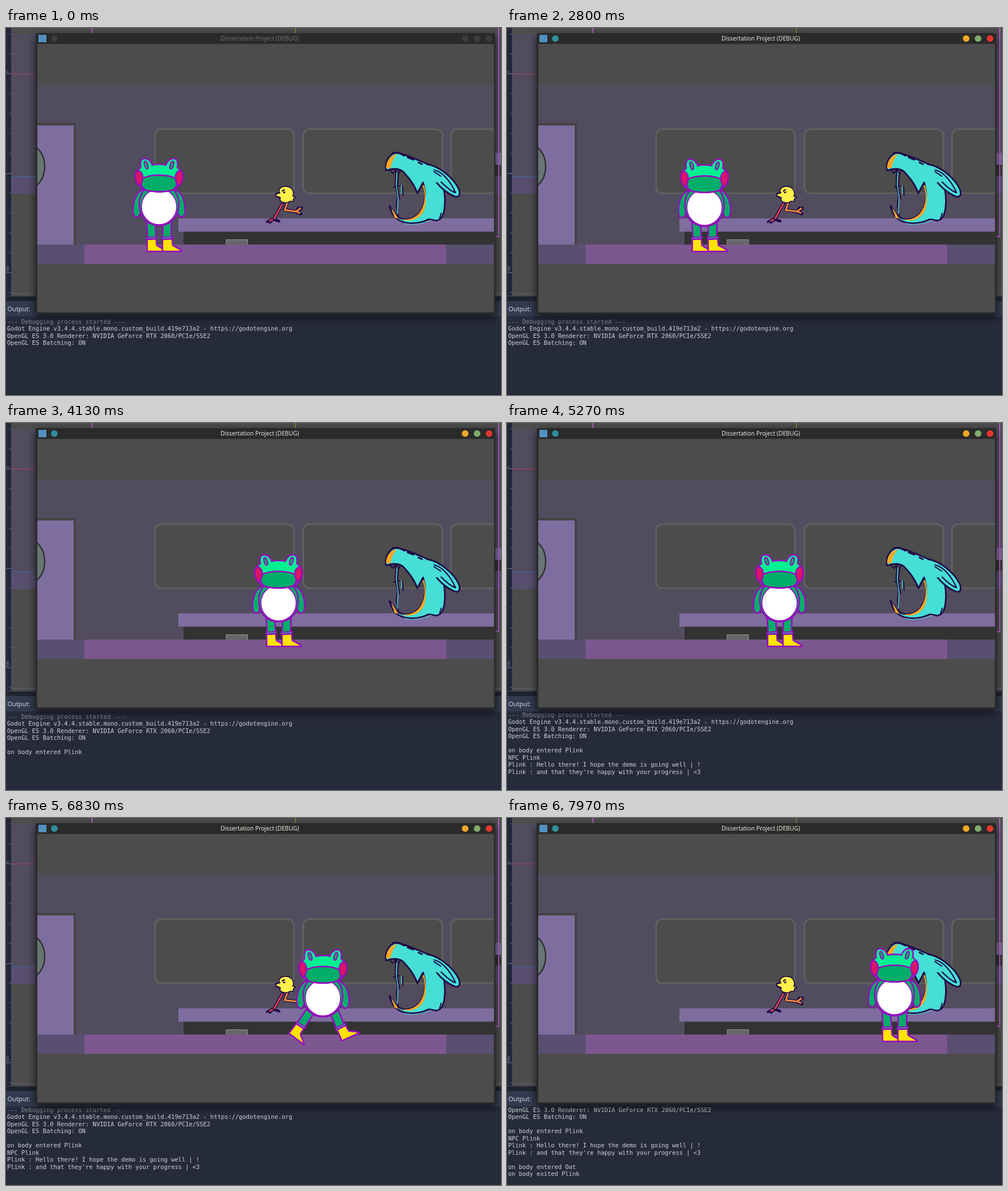
Recreate the animation shown at these times as an HTML page. Size 870 px wide and 644 px high, loop 8 s.

```html
<!DOCTYPE html>
<html lang="en">
<head>
<meta charset="utf-8">
<title>Game debug session</title>
<style>
  html, body { margin: 0; width: 100%; height: 100%; overflow: hidden; background: #262b3b; }
  svg { display: block; width: 870px; height: 644px; }
  .ui { font-family: "Noto Sans", sans-serif; }
  #log { font: 10.42px "DejaVu Sans Mono", monospace; fill: #d0d2d6; white-space: pre; }
  .frog { stroke: #9a08c0; stroke-width: 2.6; stroke-linejoin: round; stroke-linecap: round; }
  .light { fill: #00f092; }
  .dark { fill: #00ad69; }
  .pink { fill: #d91566; }
  .boot { fill: #ffe400; }
  .ink { stroke: #210b48; stroke-linejoin: round; stroke-linecap: round; }
  .aqua { fill: #45dfd5; }
  .gold { fill: #f6a823; }
  .line { fill: none; }
</style>
</head>
<body>
<svg viewBox="0 0 870 644">
  <defs>
    <filter id="shade" x="-10%" y="-10%" width="120%" height="120%">
      <feDropShadow dx="0" dy="6" stdDeviation="8" flood-color="#000" flood-opacity=".68"/>
    </filter>
    <clipPath id="view"><rect x="55" y="28" width="802.5" height="471"/></clipPath>
    <clipPath id="logArea"><rect y="506" width="870" height="138"/></clipPath>
  </defs>

  <!-- editor behind the window -->
  <rect width="870" height="470" fill="#4d4d4d"/>
  <rect y="10" width="870" height="250" fill="#524c5f"/>
  <rect y="260" width="870" height="31" fill="#584f70"/>
  <rect x="858" y="219" width="12" height="21" fill="#7e6d9e"/>
  <rect x="858" y="240" width="12" height="19" fill="#333"/>
  <path d="M9 80.5H52" stroke="#b3404c"/>
  <path d="M9 260.5H52" stroke="#3a6f9e"/>
  <path d="M508.5 0V9" stroke="#7fb526"/>
  <path d="M151 0V9M866 0V366M858 366H867" stroke="#b05cc0" stroke-width="2"/>
  <rect width="9" height="470" fill="#22273a"/>
  <path d="M7.5 10V466" stroke="#68708a" stroke-width="3" stroke-dasharray="1 33.9"/>
  <path d="M0 80.5H9M0 255.5H9M0 429.5H9" stroke="#68708a"/>
  <g class="ui" font-size="6" fill="#9299a9">
    <text transform="translate(5 79) rotate(-90)">0</text>
    <text transform="translate(5 428) rotate(-90)">500</text>
  </g>
  <path d="M9 466H870" stroke="#5a5a5a" stroke-width="2"/>
  <rect y="470" width="870" height="9" fill="#1e2330"/>
  <path d="M0 470.5H870" stroke="#444a59"/>
  <rect y="479" width="870" height="27" fill="#323a4e"/>
  <rect y="506" width="870" height="138" fill="#262b3b"/>
  <text class="ui" x="2.5" y="496.5" font-size="11" fill="#d3d6dd">Output:</text>
  <g clip-path="url(#logArea)"><g id="log"></g></g>

  <!-- game window -->
  <rect x="52" y="9" width="808" height="492.5" rx="2" fill="#292929" filter="url(#shade)"/>
  <rect x="57" y="12" width="14" height="13" rx="1" fill="#5290c0"/>
  <g id="buttons">
    <circle cx="85" cy="18.5" r="5.8" data-on="#2f8f9c"/>
    <circle cx="807" cy="18.5" r="5.8" data-on="#eda827"/>
    <circle cx="828" cy="18.5" r="5.8" data-on="#7fac6b"/>
    <circle cx="849" cy="18.5" r="5.8" data-on="#e5362d"/>
  </g>
  <text id="title" class="ui" x="446" y="22" font-size="10.25" text-anchor="middle">Dissertation Project (DEBUG)</text>

  <g clip-path="url(#view)">
    <rect x="55" y="28" width="803" height="471" fill="#4c4c4c"/>
    <rect x="55" y="100" width="803" height="280" fill="#524c5f"/>
    <g fill="#4c4c4c" stroke="#606060" stroke-width="3">
      <rect x="262" y="177.5" width="244" height="112.5" rx="11"/>
      <rect x="522.5" y="177.5" width="244.5" height="112.5" rx="11"/>
      <rect x="782" y="177.5" width="244" height="112.5" rx="11"/>
    </g>
    <rect x="55" y="166.5" width="68" height="214" fill="#444"/>
    <rect x="55" y="171" width="64" height="209" fill="#7e6e9f"/>
    <ellipse cx="41" cy="243" rx="27" ry="37.5" fill="#687575" stroke="#303030" stroke-width="2.4"/>
    <rect x="303" y="334" width="555" height="23.5" fill="#7e6d9e"/>
    <rect x="312" y="357.5" width="546" height="22.5" fill="#333"/>
    <path d="M378 334H857M378 357H857" stroke="#4c4268" stroke-dasharray="2 74"/>
    <rect x="387" y="371.5" width="37.5" height="9" fill="#666" stroke="#969696"/>
    <rect x="55" y="380" width="803" height="34" fill="#594f70"/>
    <rect x="138" y="380" width="635.5" height="34" fill="#7c578f"/>

    <!-- chick -->
    <g class="ink line">
      <path stroke-width="5.6" d="M487 306L472 333M495 305L489.500 319L511 322.500L519 316M511 323L518 326M511 321L514 316"/>
      <path stroke-width="4.600" d="M459 340L469 335L480 339M469 336L464 341"/>
    </g>
    <path d="M486 308L471 335M463 339L469 336" fill="none" stroke="#e8434f" stroke-width="2.6"/>
    <path d="M495 305L490 319.500L510 322L518 316M510 322L517 325" fill="none" stroke="#f58a36" stroke-width="2.900"/>
    <path class="ink" fill="#fff04a" stroke-width="1.700" d="M480 284C483 277 495 276 501 281C506 286 506 292 504 295L509 297L505 300L505 304L499 304C495 308 486 307 482 303L481 298L474 295L475 290L480 289Z"/>
    <path class="ink line" stroke-width="2.400" d="M474 291L481 289M475 295L482 298M486 286L489 284M488 289L490 288"/>

    <!-- rabbit -->
    <g class="ink" stroke-width="2.8">
      <path class="aqua" d="M668 250C665 233 676 219 687 219C704 221 736 238 752 243C766 253 773 290 771 312C770 327 765 337 756 338C749 337 744 334 740 337C727 343 714 344 700 341C684 337 677 326 674 312L688 331C698 338 714 338 726 325C738 310 739 290 733 271L723 290C717 273 707 262 698 252C690 246 680 246 668 250Z"/>
      <path class="aqua" d="M740 239C760 242 786 262 796 283C799 292 797 297 790 296C775 291 758 276 748 258"/>
      <path class="aqua" stroke-width="2.200" d="M750 249C765 250 781 268 790 289C778 285 766 272 757 262Z"/>
    </g>
    <path class="aqua" d="M736 240C748 243 758 253 765 270L745 272Z"/>
    <path class="gold" d="M668 246C668 233 675 224 688 221C680 229 677 239 676 246Z"/>
    <path class="gold" d="M732 276C739 294 736 312 726 325C716 336 702 338 693 334C709 343 728 335 735 320C740 305 738 289 735 276Z"/>
    <path class="gold" d="M677 315L690 335L683 333Z"/>
    <g class="ink line">
      <path stroke-width="3" d="M680 219L690 219L700 224M706 227L716 231M725 236L731 239"/>
      <path stroke-width="2" d="M674 249L680 255L685 249L690 256L693 249M685 250L684 275L688 295L686 312L690 333M690 255L688 278L692 300M681 279L692 277M697 277L698 294M765 325L762 334M752 252L764 260"/>
    </g>
    <path d="M687 253L686 275L689 297L688 326M695 276L695 290" fill="none" stroke="#45dfd5" stroke-width="1.4"/>
    <path d="M700 343C716 347 737 342 748 337" fill="none" stroke="#45dfd5"/>
    <rect x="659" y="314" width="1.5" height="1.5" fill="#2d2446"/>

    <!-- frog, drawn around x = 0 -->
    <g id="frog" class="frog">
      <g id="legL">
        <path class="dark" d="M-22 340H-7L-5 368H-20Z"/>
        <path class="boot" d="M-21 371L-5 370L-4 381C2 386 10 388 12 392H-21Z"/>
        <path class="light" d="M-22 367.500L-4 366V369L-22 370.500Z" stroke-width="2"/>
      </g>
      <g id="legR">
        <path class="dark" d="M7 340H22L21 368H6Z"/>
        <path class="boot" d="M6 371L23 370L24 381C30 386 38 387 40 392H6Z"/>
        <path class="light" d="M4 367.500L24 366V369L5 370.500Z" stroke-width="2"/>
      </g>
      <g id="torso">
        <path id="arm" class="dark" d="M-27 284C-40 287 -46 304 -46 321C-46 331 -40 334 -36 331C-32 327 -32 319 -34 313L-24 288Z"/>
        <use href="#arm" transform="scale(-1 1)"/>
        <path class="dark" d="M-25 284C-33 291 -36 304 -34 318C-31 336 -17 347 0 347C17 347 31 336 34 318C36 304 33 291 25 284Z"/>
        <ellipse cy="314" rx="31" ry="31.5" fill="#fff" stroke-width="1.6"/>
        <path class="light" d="M-40 254C-38 249 -34 247 -32 245C-34 236 -32 230 -26 229.500C-19 229 -14 235 -12 241C-6 239 6 239 12 241C14 235 19 229 26 229.500C32 230 34 236 32 245C34 247 38 249 40 254C44 266 38 279 25 284.500C10 289 -10 289 -25 284.500C-38 279 -44 266 -40 254Z"/>
        <path class="dark" d="M-30 265C-16 256.500 16 256.500 30 265C33 272 32 279 25 284.500C10 289 -10 289 -25 284.500C-32 279 -33 272 -30 265Z"/>
        <g id="side">
          <ellipse class="dark" cx="-22.500" cy="241" rx="2.800" ry="7" transform="rotate(-17 -22.500 241)" stroke-width="2"/>
          <path class="pink" d="M-38 250C-31 252 -28 258 -29 265C-30 272 -32 276 -34 277C-41 274 -45 258 -38 250Z"/>
        </g>
        <use href="#side" transform="scale(-1 1)"/>
      </g>
    </g>
  </g>
</svg>
<script>
const LOOP = 8000, LINE = 12.5;
const $ = id => document.getElementById(id);

// [time, position] of the frog
const path = [[0, 269], [1860, 269], [2520, 319], [2800, 347], [3560, 450], [3740, 479],
  [6090, 479], [6170, 488], [6830, 557], [7030, 572], [7840, 680], [7870, 681], [LOOP, 681]];
// [start, end, stride period]
const walks = [[1860, 3740, 376], [6090, 7870, 423]];
const stalls = [[870, 1070], [6830, 7030]];
// [time, text]
const log = [
  [0, "--- Debugging process started ---"],
  [0, "Godot Engine v3.4.4.stable.mono.custom_build.419e713a2 - https://godotengine.org"],
  [0, "OpenGL ES 3.0 Renderer: NVIDIA GeForce RTX 2060/PCIe/SSE2"],
  [0, "OpenGL ES Batching: ON"],
  [0, ""],
  [3150, "on body entered Plink"],
  [4600, "NPC Plink"],
  [4600, "Plink : Hello there! I hope the demo is going well | !"],
  [5100, "Plink : and that they're happy with your progress | <3"],
  [5100, ""],
  [7090, "on body entered Oat"],
  [7170, "on body exited Plink"]
];

const rows = log.map(([, text], i) => {
  const row = document.createElementNS("http://www.w3.org/2000/svg", "text");
  row.setAttribute("x", 2);
  row.setAttribute("y", 518.5 + i * LINE);
  row.textContent = text;
  $("log").append(row);
  return row;
});
rows[0].setAttribute("fill", "#868a93");

function position(t) {
  const i = path.findIndex(p => p[0] > t);
  const [t0, x0] = path[i - 1], [t1, x1] = path[i];
  return x0 + (x1 - x0) * (t - t0) / (t1 - t0);
}

const turn = (leg, angle, x) => $(leg).setAttribute("transform", `rotate(${angle} ${x} 327)`);

function draw(time) {
  const stall = stalls.find(([a, b]) => time >= a && time < b);
  const t = stall ? stall[0] : time;

  // positive swing spreads the legs, negative swing crosses them
  const walk = walks.find(([a, b]) => t >= a && t < b);
  let swing = 0;
  if (walk) {
    const ease = Math.min(1, (walk[1] - t) / 80);
    swing = -ease * Math.sin((t - walk[0]) / walk[2] * 2 * Math.PI);
  }
  turn("legL", swing * (swing > 0 ? 37 : 10), -19);
  turn("legR", -swing * (swing > 0 ? 24 : 11), 17);

  const bob = walk ? 0.8 + Math.abs(swing) : 0.8 - 1.3 * Math.cos(t / 1570 * 2 * Math.PI);
  $("torso").setAttribute("transform", `translate(0 ${bob})`);
  $("frog").setAttribute("transform", `translate(${position(t)} 0)`);

  const focused = t >= 30;
  $("title").setAttribute("fill", focused ? "#ece7da" : "#76716a");
  for (const dot of $("buttons").children)
    dot.setAttribute("fill", focused ? dot.dataset.on : "#3d3d3d");

  const shown = log.filter(([at]) => t >= at).length;
  rows.forEach((row, i) => row.setAttribute("visibility", i < shown ? "visible" : "hidden"));
  const scroll = shown < 9 ? 0 : 3 + Math.max(0, shown - 10) * LINE;
  $("log").setAttribute("transform", `translate(0 ${-scroll})`);
}

const start = performance.now();
function tick() {
  draw((performance.now() - start) % LOOP);
  requestAnimationFrame(tick);
}
draw(0);
tick();
</script>
</body>
</html>
```
